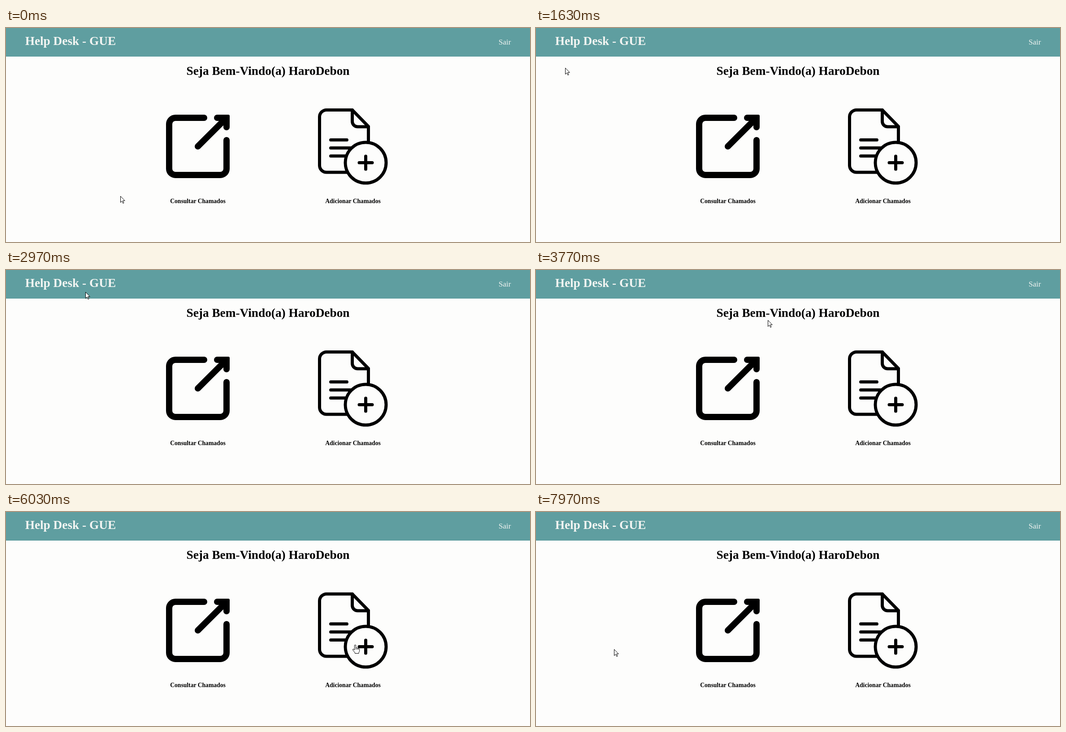
Animation of 1169x479 px, one loop 8 s. Source, as an HTML page:

```html
<!DOCTYPE html>
<html lang="pt-BR">
<head>
<meta charset="utf-8">
<title>Help Desk</title>
<style>
  html, body { margin: 0; width: 100%; height: 100%; overflow: hidden; background: #fdfdfc; }
  svg { display: block; width: 1169px; height: 479px; }
  text { font-family: "Liberation Serif", "Times New Roman", serif; font-weight: bold; }
  .big { font-size: 27.3px; }
  .label { font-size: 13.65px; text-anchor: middle; }
  .exit { font-size: 17.06px; font-weight: normal; text-anchor: end; }
  .light { fill: #f3f5f2; }
  .icon { fill: none; stroke: #000; stroke-linecap: round; stroke-linejoin: round; }
  .pointer { fill: #fff; stroke: #000; stroke-width: 1; stroke-linejoin: round; }
  #ibeam { fill: none; stroke: #fff; mix-blend-mode: difference; }
</style>
</head>
<body>
<svg viewBox="0 0 1169 479">
  <rect width="1169" height="479" fill="#fdfdfc"/>
  <rect width="1169" height="64" fill="#5f9ea0"/>
  <text class="big light" x="42.7" y="38">Help Desk - GUE</text>
  <text class="exit light" x="1126.5" y="37">Sair</text>
  <text class="big" x="584.5" y="105" text-anchor="middle">Seja Bem-Vindo(a) HaroDebon</text>

  <g class="icon" stroke-width="14">
    <path d="M442 201H378A14 14 0 0 0 364 215V315A14 14 0 0 0 378 329H478A14 14 0 0 0 492 315V251"/>
    <path d="M428 265L492 201M471 201H492V222"/>
  </g>
  <rect x="485" y="194" width="14" height="14" rx="3"/>
  <text class="label" x="428" y="392">Consultar Chamados</text>

  <g class="icon" stroke-width="7">
    <path d="M760 323H715A15.5 15.5 0 0 1 699.5 307.5V199A15.5 15.5 0 0 1 715 183.5H772.5L808.5 220.5V256"/>
    <path d="M772.5 183.5V209A12 12 0 0 0 784.5 221H808.5"/>
    <path d="M724.5 250.5H760.5M724.5 268.5H771M724.5 286.5H758"/>
    <circle cx="802.5" cy="301.5" r="45.5" fill="#fdfdfc"/>
    <path d="M788 301.5H817M802.5 287V316"/>
  </g>
  <text class="label" x="774" y="392">Adicionar Chamados</text>

  <g id="arrow" class="pointer">
    <path d="M.5 .5V14.5L3.7 11.4L6 16.5L8 15.6L5.8 10.6H10.2Z"/>
  </g>
  <g id="hand" class="pointer">
    <path d="M-1.6 12V2Q-1.6 .5 0 .5T1.6 2V7Q4.2 6 4.6 7.8Q7 7 7.2 8.8Q9.6 8.4 9.6 10.5V13.5Q9.6 16 8 17.5V19.5H-.5V18L-5.2 12Q-6.2 10 -4.2 9.8Q-3 9.8 -1.6 12Z"/>
    <path d="M1.6 7V11M4.6 8V11M7.2 9V11" fill="none"/>
  </g>
  <g id="ibeam">
    <path d="M-2.5 -5.5H-.5L0 -5L.5 -5.5H2.5M0 -5V5M-2.5 5.5H-.5L0 5L.5 5.5H2.5"/>
  </g>
</svg>
<script>
  const LOOP = 8000;

  // time, x, y of the pointer's hot spot
  const path = [
    [0, 255, 376], [250, 215, 396], [870, 0, 139], [1150, 0, 139],
    [2100, 127, 41], [2300, 127, 40], [2750, 130, 40],
    [3770, 517, 112], [4630, 752, 100], [5000, 756, 100],
    [6030, 779, 297], [6350, 779, 297], [7100, 430, 270],
    [7450, 425, 275], [7970, 174, 307], [LOOP, 174, 307]
  ];

  // pointer shape, left, top, right, bottom
  const zones = [
    ["hand", 43, 14, 246, 45],
    ["hand", 1099, 20, 1127, 42],
    ["hand", 343, 180, 513, 351],
    ["hand", 689, 180, 860, 351],
    ["ibeam", 402, 81, 767, 111],
    ["ibeam", 366, 379, 490, 396],
    ["ibeam", 712, 379, 836, 396]
  ];

  const shapes = ["arrow", "hand", "ibeam"].map(id => document.getElementById(id));
  const ease = u => u * u * (3 - 2 * u);

  function pointerAt(t) {
    const i = path.findIndex(p => p[0] > t);
    const [t0, x0, y0] = path[i - 1];
    const [t1, x1, y1] = path[i];
    const u = ease((t - t0) / (t1 - t0));
    return [Math.round(x0 + (x1 - x0) * u), Math.round(y0 + (y1 - y0) * u)];
  }

  function shapeAt(x, y) {
    const zone = zones.find(([, l, t, r, b]) => x >= l && x <= r && y >= t && y <= b);
    return zone ? zone[0] : "arrow";
  }

  function draw() {
    const [x, y] = pointerAt(performance.now() % LOOP);
    const active = shapeAt(x, y);
    for (const el of shapes) {
      el.style.display = el.id === active ? "" : "none";
      el.setAttribute("transform", `translate(${x} ${y})`);
    }
    requestAnimationFrame(draw);
  }
  draw();
</script>
</body>
</html>
```
